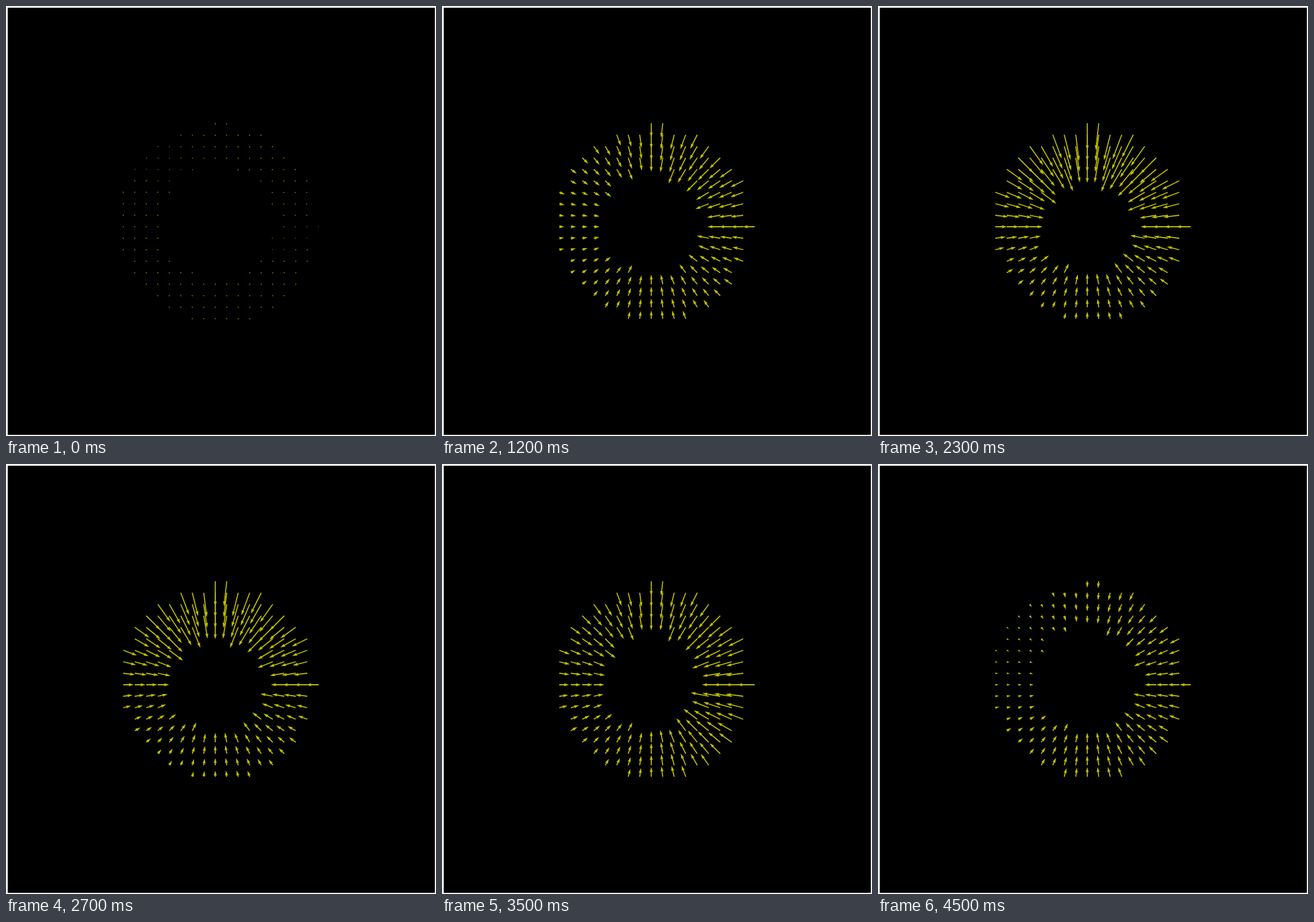
These frames come from a looping animation (748x748 px, 4.6 s). An HTML page with a canvas:

```html
<!DOCTYPE html>
<html lang="en">
<head>
<meta charset="utf-8">
<title>Radial displacement field</title>
<style>
  html, body { margin: 0; width: 100%; height: 100%; overflow: hidden; background: #fff; }
  canvas { display: block; }
</style>
</head>
<body>
<canvas id="stage" width="748" height="748"></canvas>
<script>
const ctx = document.getElementById('stage').getContext('2d');
const STEP = 100, COUNT = 46;
const CX = 364, CY = 384, GAP = 20;
const W = 1.78; // shaft width; the head is 5 W long and 3 W wide

// The two rims of the ring, in grid units from the centre
const INNER = { x: 0.2, y: -0.4, r: Math.sqrt(23.8) };
const OUTER = { x: 0.29, y: -0.3, r: Math.sqrt(76.28) };

// Key poses of the beat: even squeeze, sideways and vertical bias, oval bias
const pose = (at, squeeze, biasX, biasY, oval, skew) => ({ at, squeeze, biasX, biasY, oval, skew });
const POSES = [
  pose(0, 1.6, 0.5, -1, 0, 0),
  pose(8, 9.2, 2.3, 0.4, -1.1, -0.9),
  pose(12, 17.6, 6.3, -4.5, -2.1, -1.5),
  pose(19, 28, 4.4, -13.2, -2.1, 0.6),
  pose(27, 24, 2, -14.3, -3.2, 0.8),
  pose(35, 23, 6.9, -3.8, 1.4, 2),
  pose(45, 13.7, 7, 2.1, -0.7, -1.3)
];

function hermite(a, b, ma, mb, u) {
  const u2 = u * u, u3 = u2 * u;
  return (2 * u3 - 3 * u2 + 1) * a + (u3 - 2 * u2 + u) * ma
       + (3 * u2 - 2 * u3) * b + (u3 - u2) * mb;
}

function slope(name, k) {
  const a = POSES[Math.max(k - 1, 0)], b = POSES[Math.min(k + 1, POSES.length - 1)];
  return (b[name] - a[name]) / (b.at - a.at);
}

function poseAt(step) {
  let k = 0;
  while (k < POSES.length - 2 && step >= POSES[k + 1].at) k++;
  const a = POSES[k], b = POSES[k + 1], span = b.at - a.at;
  const now = {};
  for (const name in a) {
    now[name] = hermite(a[name], b[name],
      slope(name, k) * span, slope(name, k + 1) * span, (step - a.at) / span);
  }
  return now;
}

const reach = (rim, x, y) => Math.hypot(x - rim.x, y - rim.y) / rim.r;

const points = [];
for (let y = -9; y <= 9; y++) {
  for (let x = -9; x <= 9; x++) {
    if (reach(INNER, x, y) < 1 || reach(OUTER, x, y) > 1) continue;
    const depth = (Math.hypot(x, y) - INNER.r) / (OUTER.r - INNER.r) - 0.5;
    points.push({ x: CX + GAP * x, y: CY + GAP * y, angle: Math.atan2(y, x), depth });
  }
}

// The inner wall squeezes a little more, the outer wall follows the vertical bias more
function shift({ angle, depth }, now) {
  const length = now.squeeze * (1 - 0.08 * depth)
    + now.biasX * Math.cos(angle)
    + now.biasY * Math.sin(angle) * (1 + 0.4 * depth)
    + now.oval * Math.cos(2 * angle)
    + now.skew * Math.sin(2 * angle);
  return Math.max(0, length);
}

function polygon(pts) {
  ctx.beginPath();
  pts.forEach(([x, y]) => ctx.lineTo(x, y));
  ctx.closePath();
  ctx.fill();
}

const hexagon = Array.from({ length: 6 }, (_, n) =>
  [Math.cos(n * Math.PI / 3) * W / 2, Math.sin(n * Math.PI / 3) * W / 2]);

function arrow(p, length) {
  ctx.save();
  ctx.translate(p.x, p.y);
  if (length < W) {
    polygon(hexagon);
  } else {
    ctx.rotate(p.angle + Math.PI);
    // Arrows shorter than their head shrink as a whole
    const w = W * Math.min(1, length / (5 * W));
    const neck = length - 4.5 * w, barb = length - 5 * w;
    polygon([[0, -w / 2], [neck, -w / 2], [barb, -1.5 * w], [length, 0],
             [barb, 1.5 * w], [neck, w / 2], [0, w / 2]]);
  }
  ctx.restore();
}

function draw(step) {
  ctx.fillStyle = '#fff';
  ctx.fillRect(0, 0, 748, 748);
  ctx.fillStyle = '#000';
  ctx.fillRect(3, 3, 743, 743);
  ctx.fillStyle = '#bfbf00';
  const now = poseAt(step);
  points.forEach(p => arrow(p, shift(p, now)));
}

const start = performance.now();
function tick() {
  const t = Math.max(0, performance.now() - start);
  draw(Math.floor(t / STEP) % COUNT);
  requestAnimationFrame(tick);
}
tick();
</script>
</body>
</html>
```
